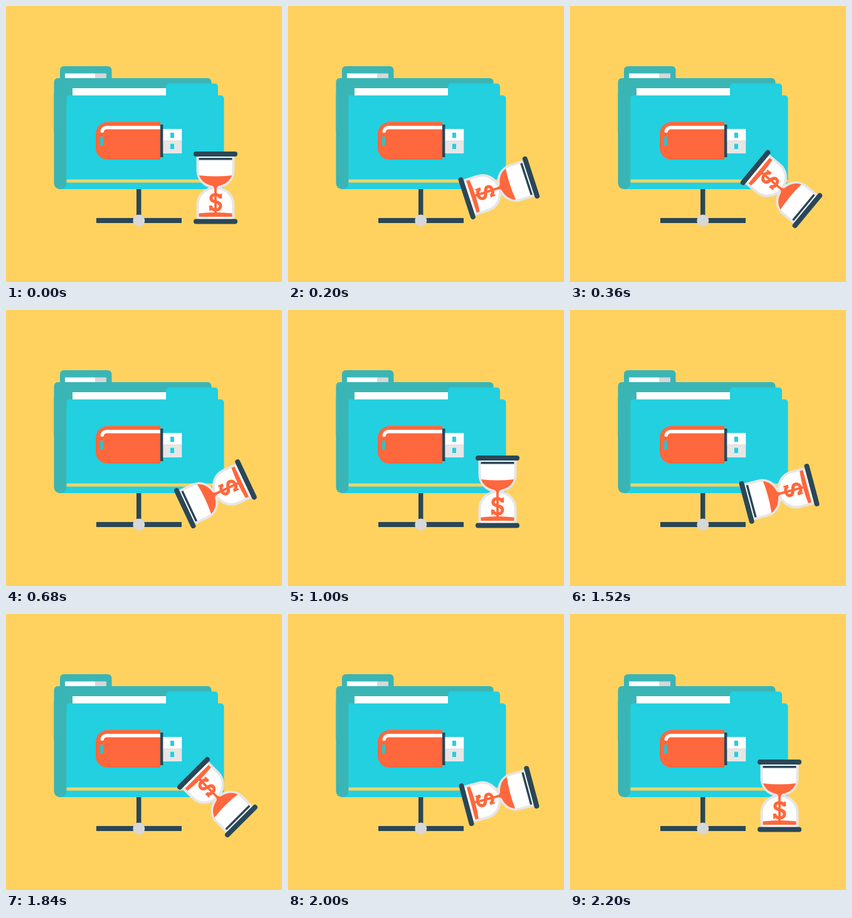
Write an HTML page with a canvas that moves like this. It is 440 px wide and 440 px high and loops after 2400 ms.

```html
<!DOCTYPE html>
<html lang="en">
<head>
<meta charset="utf-8">
<title>Folder and hourglass</title>
<style>
html, body { margin: 0; width: 100%; height: 100%; overflow: hidden; background: #ffd25f; }
canvas { display: block; width: 440px; height: 440px; }
</style>
</head>
<body>
<canvas id="stage"></canvas>
<script>
const SIZE = 440, LOOP = 2400, STEP = 40;
const YELLOW = '#ffd25f', TEAL = '#3ab5b5', CYAN = '#22d0e0', ORANGE = '#ff673c';
const DARK = '#2a4757', GREY = '#d7d7d7', PALE = '#e6e6e6', WHITE = '#fff';
const PIVOT = { x: 335, y: 291.5 };

const canvas = document.getElementById('stage');
const ctx = canvas.getContext('2d');
const dpr = window.devicePixelRatio || 1;
canvas.width = canvas.height = SIZE * dpr;

// Filled box given by its edges, with an optional corner radius
function box(color, x1, y1, x2, y2, r = 0) {
  ctx.fillStyle = color;
  ctx.beginPath();
  ctx.roundRect(x1, y1, x2 - x1, y2 - y1, r);
  ctx.fill();
}

function fill(color, d) {
  ctx.fillStyle = color;
  ctx.fill(new Path2D(d));
}

function stroke(color, width, d, cap = 'butt') {
  ctx.strokeStyle = color;
  ctx.lineWidth = width;
  ctx.lineCap = cap;
  ctx.stroke(new Path2D(d));
}

function drawStand() {
  box(DARK, 208, 290, 215.5, 342);
  box(DARK, 144, 338, 280, 346);
  ctx.fillStyle = GREY;
  ctx.beginPath();
  ctx.arc(211.8, 342, 9.5, 0, Math.PI * 2);
  ctx.fill();
}

function drawFolder() {
  box(TEAL, 86, 96, 168.5, 130, 6);
  box(WHITE, 94, 107.5, 142, 115.5);
  box(GREY, 142, 107.5, 160, 115.5);
  box(TEAL, 76.5, 115, 327.5, 200, [6, 6, 0, 0]);
  box(WHITE, 106, 131, 256, 146);
  box(CYAN, 255, 123.5, 338, 160, [5, 5, 0, 0]);
  box(CYAN, 96, 142.5, 347.5, 292, [5, 5, 5, 0]);
  box(CYAN, 87, 270, 100, 292);
  box(TEAL, 76.5, 140, 96.5, 292, [0, 0, 9.5, 9.5]);
  box(YELLOW, 96.5, 276.5, 347.5, 281.5);
}

function drawDrive() {
  box(ORANGE, 143, 185, 246, 245, [19, 0, 0, 19]);
  stroke(WHITE, 5.4, 'M153.3 199.5 Q154.5 193.7 161 193.7 H246');
  stroke(WHITE, 5.4, 'M153.3 199.3 V199.4', 'round');
  box('#39bdc4', 150, 208, 155, 223, 1.5);
  box(DARK, 246, 189, 250.5, 241);
  box(WHITE, 250.5, 196, 280.3, 215);
  box(PALE, 250.5, 215, 280.3, 235);
  box(GREY, 250.5, 214.5, 280.3, 215.5);
  box(CYAN, 262, 202, 268, 210.3);
  box(CYAN, 262, 219.7, 268, 228);
}

function drawHourglass() {
  const upper = 'M305.5 238 V262 C305.5 276 315 286 330 289.5 H338 C353 286 362.5 276 362.5 262 V238 Z';
  const lower = 'M305.5 342 V317 C305.5 303 315 293 330 289.5 H338 C353 293 362.5 303 362.5 317 V342 Z';
  for (const bulb of [upper, lower]) {
    fill(WHITE, bulb);
    stroke(PALE, 4, bulb);
  }

  box(DARK, 307.5, 242, 360.5, 245.5);
  fill(ORANGE, 'M308 270 Q334 273 360 270 C357 279 349 284.5 340 286.5 Q336 287.5 336 291 H332 Q332 287.5 328 286.5 C319 284.5 311 279 308 270 Z');
  fill(ORANGE, 'M307.5 336 V330.5 Q334 327.5 360.5 330.5 V336 Z');

  stroke(ORANGE, 3.8, 'M334 287 V331');
  stroke(ORANGE, 5, 'M342 306.5 C341 302.5 338 300.7 334 300.7 C329.5 300.7 326.8 303 326.8 306.2 C326.8 314.5 342 310 342 318.6 C342 322.6 338.8 325 334.4 325 C330 325 327 322.8 326 318.5');
  stroke(ORANGE, 2.6, 'M342.8 299 V307 M325.4 318 V326.5');

  box(DARK, 299, 232, 369, 240, 4);
  box(DARK, 299, 339.5, 369, 347.5, 4);
}

// One full turn clockwise, a rest, one full turn back, a rest
function angleAt(t) {
  if (t < 1000) return t / 1000 * 360;
  if (t < 1240) return 0;
  if (t < 2200) return 360 - (t - 1240) / 960 * 360;
  return 0;
}

function draw(t) {
  ctx.setTransform(dpr, 0, 0, dpr, 0, 0);
  box(YELLOW, 0, 0, SIZE, SIZE);
  drawStand();
  drawFolder();
  drawDrive();
  ctx.translate(PIVOT.x, PIVOT.y);
  ctx.rotate(angleAt(t) * Math.PI / 180);
  ctx.translate(-PIVOT.x, -PIVOT.y);
  drawHourglass();
}

const start = performance.now();
function tick() {
  const t = (performance.now() - start) % LOOP;
  draw(Math.floor(t / STEP) * STEP);
  requestAnimationFrame(tick);
}
tick();
</script>
</body>
</html>
```
